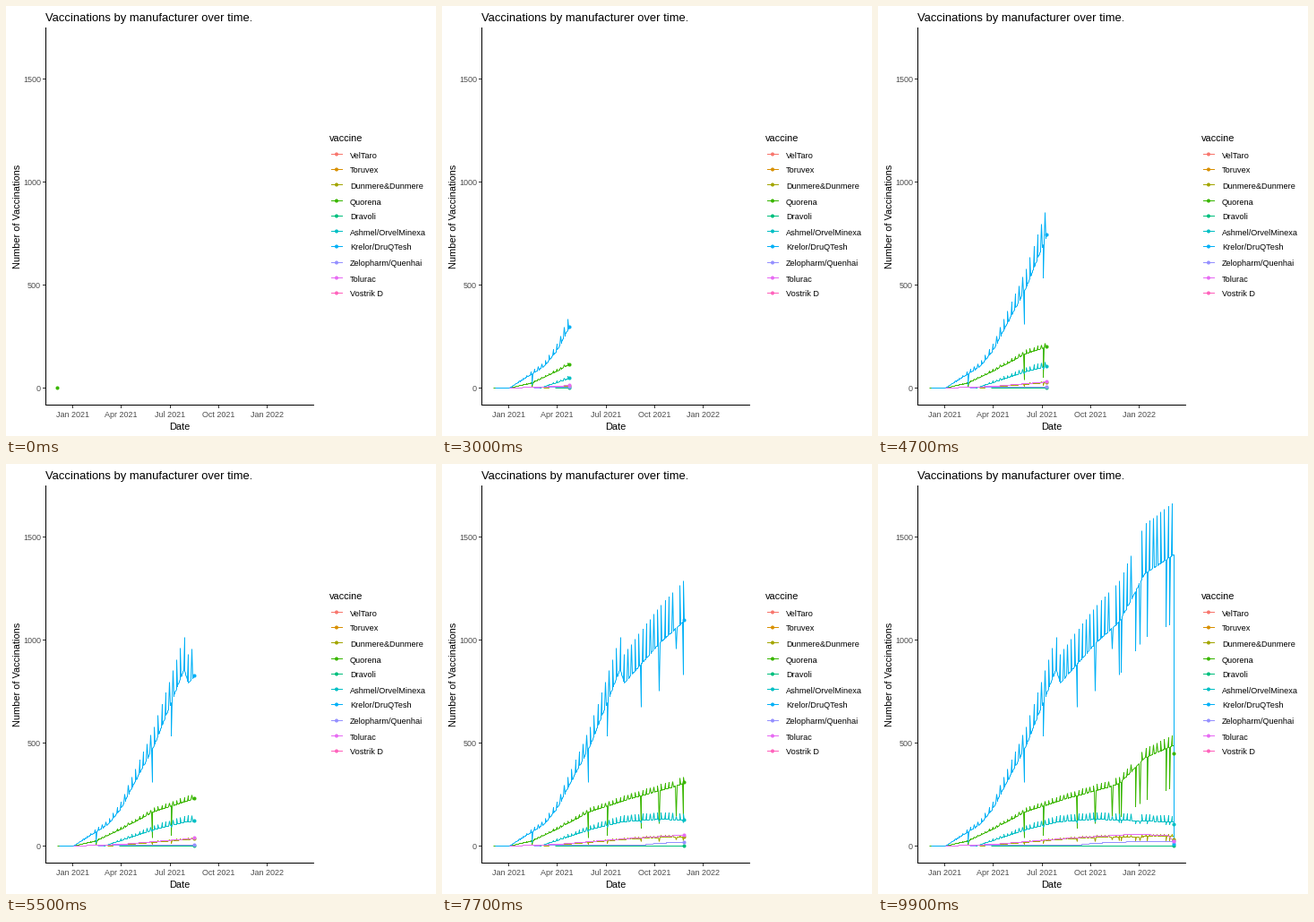
Animation of 480x480 px, one loop 10 s. Source, as a matplotlib script:

```python
import matplotlib.pyplot as plt
import numpy as np
from matplotlib.animation import FuncAnimation
from matplotlib.patches import Circle

plt.rcParams["font.family"] = "Liberation Sans"
plt.rcParams["path.simplify"] = False

SIZE, DPI, FRAMES = 480, 80, 100
PT = 72 / DPI  # points per pixel

DAYS = np.arange(460)
X0, DAY_W = 57.4, 0.5953
Y0, UNIT_H = 426.5, 0.23

# Days with missing reports, and weekly peaks lost to holidays
GAPS = [73, 178, 214, 277, 311, 343, 356, 360, 387, 395, 409, 444, 451]
HOLIDAYS = [385, 392]

VACCINES = {
    "VelTaro": "#F8766D", "Toruvex": "#D89000",
    "Dunmere&Dunmere": "#A3A500", "Quorena": "#39B600",
    "Dravoli": "#00BF7D", "Ashmel/OrvelMinexa": "#00BFC4",
    "Krelor/DruQTesh": "#00B0F6", "Zelopharm/Quenhai": "#9590FF",
    "Tolurac": "#E76BF3", "Vostrik D": "#FF62BC",
}


def series(start, trend, peak=1.0, keep=1.0, ramp=1, last=None):
    """Trend with weekly peaks, gaps that shrink with time, a partial last day."""
    val = np.interp(DAYS, *zip(*trend))
    weekly = (DAYS % 7 == 0) & ~np.isin(DAYS, HOLIDAYS)
    gap = np.isin(DAYS, GAPS)
    val = val * np.where(weekly, peak, 1)
    val = val * np.where(gap, np.minimum(keep, DAYS / ramp), 1)
    if last is not None:
        val[-1] = last
    return start, val


DATA = {
    "Dunmere&Dunmere": series(
        95, [(95, 0), (250, 33), (312, 42), (459, 48)], 1.2, 0.55, last=30),
    "Quorena": series(
        0, [(30, 0), (72, 24), (119, 82), (182, 168), (257, 230), (335, 285),
            (357, 305), (404, 428), (459, 490)], 1.1, 0.6, 780, 447),
    "Dravoli": series(116, [(0, 0)]),
    "Ashmel/OrvelMinexa": series(
        80, [(88, 0), (182, 80), (240, 117), (312, 130), (459, 116)],
        1.25, 0.9, last=104),
    "Krelor/DruQTesh": series(
        4, [(30, 0), (95, 105), (119, 180), (182, 490), (238, 860),
            (245, 790), (312, 985), (357, 1090), (404, 1322), (459, 1415)],
        1.18, 0.765, 270, 10),
    "Zelopharm/Quenhai": series(
        75, [(75, 2), (280, 5), (312, 14), (404, 23), (459, 20)]),
    "Tolurac": series(
        30, [(30, 0), (119, 8), (250, 36), (380, 57), (447, 52), (459, 20)]),
}

fig = plt.figure(figsize=(SIZE / DPI, SIZE / DPI), dpi=DPI, facecolor="white")
ax = fig.add_axes([0, 0, 1, 1])
ax.set_xlim(0, SIZE)
ax.set_ylim(SIZE, 0)
ax.axis("off")


def to_px(day, val):
    """Pixel centres for a day and a value."""
    x = np.floor(X0 + DAY_W * np.asarray(day)) + 0.5
    y = np.floor(Y0 - UNIT_H * np.asarray(val)) + 0.5
    return x, y


def text(x, y, s, px, color="black", **kw):
    ax.text(x, y, s, fontsize=px * PT, color=color, **kw)


def line(xs, ys, color, z=2):
    return ax.plot(xs, ys, color=color, lw=PT, zorder=z, snap=False,
                   solid_capstyle="butt", solid_joinstyle="bevel")[0]


def dot(x, y, color):
    return ax.add_patch(Circle((x, y), 2.05, color=color, lw=0, zorder=5))


def draw_axes():
    line([44.5, 44.5], [24, 446], "black", 4)
    line([44, 344], [445.5, 445.5], "black", 4)
    for val in range(0, 1501, 500):
        y = to_px(0, val)[1]
        line([41, 44], [y, y], "#333333")
        text(39, y + 3.8, val, 9, "#4D4D4D", ha="right")
    months = ("Jan 2021", "Apr 2021", "Jul 2021", "Oct 2021", "Jan 2022")
    for i, month in enumerate(months):
        x = to_px(29 + 91.25 * i, 0)[0]
        line([x, x], [446, 449], "#333333")
        text(x, 459, month, 9, "#4D4D4D", ha="center")
    text(44, 17, "Vaccinations by manufacturer over time.", 13)
    text(194, 473, "Date", 11, ha="center")
    text(18, 234.5, "Number of Vaccinations", 11, rotation=90,
         ha="right", va="center")


def draw_legend():
    text(361, 151, "vaccine", 11)
    for i, (name, color) in enumerate(VACCINES.items()):
        y = np.floor(166.2 + 17.28 * i) - 0.5
        line([363, 376], [y, y], color)
        dot(369, y, color)
        text(384, y + 4, name, 9.2)


draw_axes()
draw_legend()
paths = {name: line([], [], VACCINES[name], 3) for name in DATA}
heads = {name: dot(0, 0, VACCINES[name]) for name in DATA}


def update(n):
    t = DAYS[-1] * (n + 1) / FRAMES if n else 0
    for name, (start, val) in DATA.items():
        path, head = paths[name], heads[name]
        shown = t >= start
        path.set_visible(shown)
        head.set_visible(shown)
        if shown:
            days = np.append(DAYS[start:int(t) + 1], t)
            xs, ys = to_px(days, np.interp(days, DAYS, val))
            path.set_data(xs, ys)
            head.set_center((xs[-1], ys[-1]))
    return [*paths.values(), *heads.values()]


anim = FuncAnimation(fig, update, frames=FRAMES, interval=100,
                     repeat=True, repeat_delay=0, blit=False)
plt.show()
```
